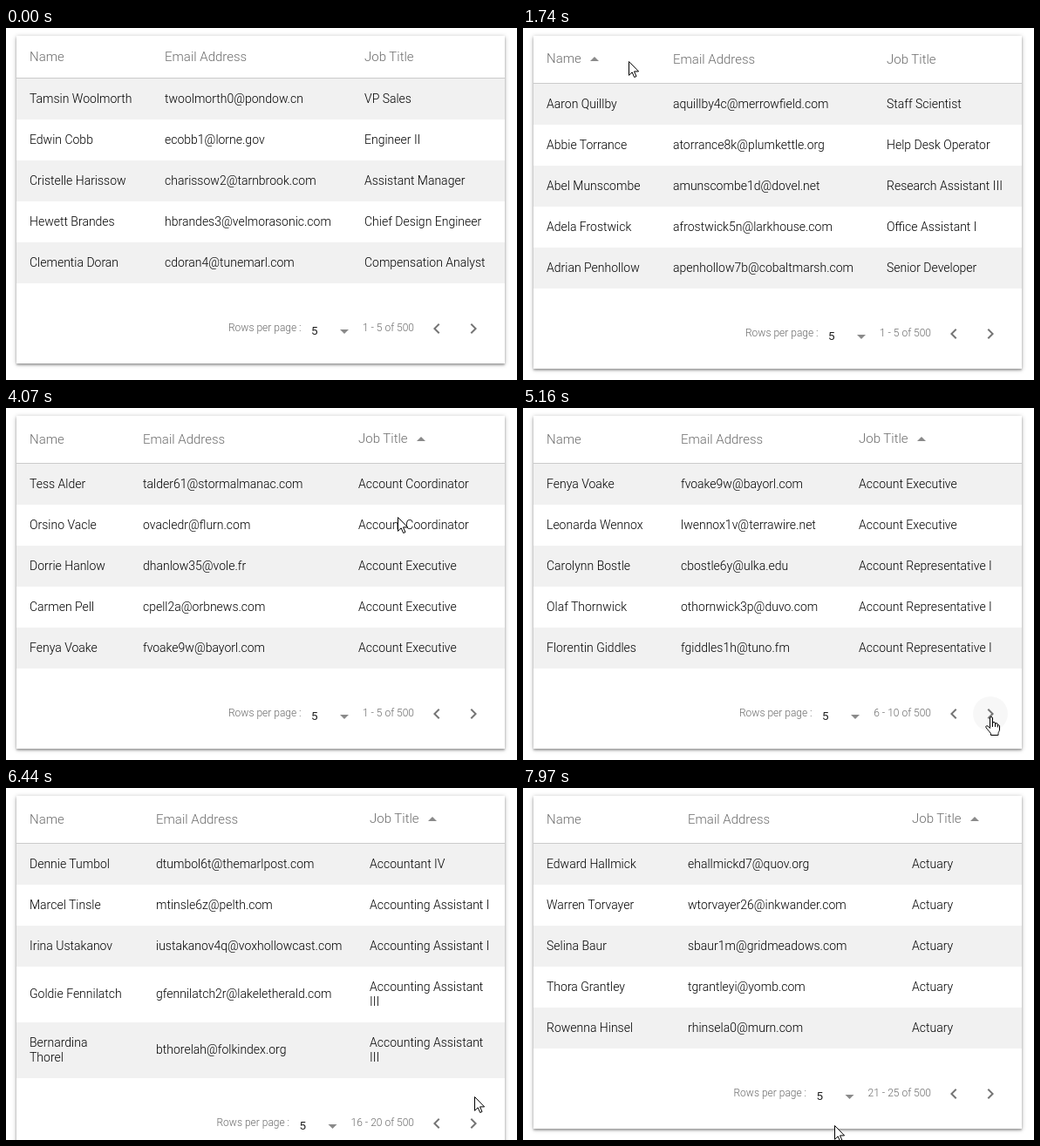
An HTML page that plays this animation: 586 px wide and 404 px high, repeating every 8000 ms.

```html
<!DOCTYPE html>
<html lang="en">
<head>
<meta charset="utf-8">
<title>Sortable table</title>
<style>
html, body { margin: 0; width: 100%; height: 100%; overflow: hidden; background: #fff; }
#stage { position: absolute; left: 0; top: 0; width: 586px; height: 404px; overflow: hidden; }
#card {
  position: absolute; left: 12px; top: 9px; width: 560px; background: #fff;
  box-shadow: 0 2px 2px rgba(0,0,0,.24), 0 1px 5px rgba(0,0,0,.3);
}
svg { position: absolute; left: 0; top: 0; }
text { font-family: Roboto, sans-serif; font-weight: 300; white-space: pre; }
.head { font-size: 15px; fill: #6c6c6c; }
.cell { font-size: 14px; fill: #000; }
.foot { font-size: 12px; fill: #6a6a6a; }
.size { font-size: 13.5px; font-weight: 400; fill: #212121; }
.icon { fill: #757575; }
.tri { fill: #8a8a8a; }
</style>
</head>
<body>
<div id="stage">
  <div id="card"></div>
  <svg width="586" height="404" viewBox="0 0 586 404">
    <g id="table"></g>
    <circle id="ripple" cx="536" r="20" opacity="0"/>
    <g id="foot"></g>
    <g id="cursor" fill="#fff" stroke="#000" stroke-linejoin="round">
      <path id="arrow" d="M.5 .5V16.3L4.2 12.8 6.7 18.5 9 17.5 6.5 11.9H11.6Z"/>
      <g id="hand" transform="translate(-7)">
        <path d="M5.5 13.5V2a1.5 1.5 0 0 1 3 0V8a1.5 1.5 0 0 1 3 0v1a1.4 1.4 0 0 1 2.8 .3v1a1.2 1.2 0 0 1 2.2 .6V15c0 2-1.5 3-1.5 4.5V21.5H6.5V19.5C5 17.5 3 15.5 .9 12.6 .3 11.3 1.8 10.2 3 11Z"/>
        <path fill="none" d="M8.5 8v4M11.5 9v3M14.3 10v2.5"/>
      </g>
    </g>
  </svg>
</div>
<script>
const LOOP = 8000;
const titles = ['Name', 'Email Address', 'Job Title'];
const titleWidth = [40, 94, 57];

// Each view: x of the email and job columns, then rows "name, email, job"; "/" breaks a line.
const view = (email, job, text) => ({
  cols: [27, email, job],
  rows: text.trim().split('\n').map(line => line.split(',').map(s => s.trim()))
});

const start = view(182, 411, `
  Tamsin Woolmorth, twoolmorth0@pondow.cn, VP Sales
  Edwin Cobb, ecobb1@lorne.gov, Engineer II
  Cristelle Harissow, charissow2@tarnbrook.com, Assistant Manager
  Hewett Brandes, hbrandes3@velmorasonic.com, Chief Design Engineer
  Clementia Doran, cdoran4@tunemarl.com, Compensation Analyst`);
const byName = view(172, 417, `
  Aaron Quillby, aquillby4c@merrowfield.com, Staff Scientist
  Abbie Torrance, atorrance8k@plumkettle.org, Help Desk Operator
  Abel Munscombe, amunscombe1d@dovel.net, Research Assistant III
  Adela Frostwick, afrostwick5n@larkhouse.com, Office Assistant I
  Adrian Penhollow, apenhollow7b@cobaltmarsh.com, Senior Developer`);
const byEmail = view(177, 427, `
  Zenobiah Zurelli, zzurelli22@webquill.com, Librarian
  Zacharia Swinmoore, zswinmoorea8@ovlu.com, Safety Technician II
  Zorana Clavenhurst, zclavenhurst3e@sorvane.com, Software Consultant
  Zephyr Barwinde, zbarwinde85@deckhollow.net, Registered Nurse
  Yoren Maddeley, ymaddeley9t@cablewaypartners.com, Director of Sales`);
const jobs = [
  view(157, 404, `
  Tess Alder, talder61@stormalmanac.com, Account Coordinator
  Orsino Vacle, ovacledr@flurn.com, Account Coordinator
  Dorrie Hanlow, dhanlow35@vole.fr, Account Executive
  Carmen Pell, cpell2a@orbnews.com, Account Executive
  Fenya Voake, fvoake9w@bayorl.com, Account Executive`),
  view(181, 385, `
  Fenya Voake, fvoake9w@bayorl.com, Account Executive
  Leonarda Wennox, lwennox1v@terrawire.net, Account Executive
  Carolynn Bostle, cbostle6y@ulka.edu, Account Representative I
  Olaf Thornwick, othornwick3p@duvo.com, Account Representative I
  Florentin Giddles, fgiddles1h@tuno.fm, Account Representative I`),
  view(174, 383, `
  Lorimer Paskett, lpaskett3f@wendlow.com, Account Representative II
  Odelia Crumble, ocrumble8t@nimbor.org, Account Representative III
  Hester Vanlow, hvanlow5a@pondral.com, Account Representative IV
  Garrick Stowe, gstowe2k@fernolt.net, Accountant I
  Minna Tarbold, mtarbold9c@quibe.com, Accountant III`),
  view(172, 417, `
  Dennie Tumbol, dtumbol6t@themarlpost.com, Accountant IV
  Marcel Tinsle, mtinsle6z@pelth.com, Accounting Assistant I
  Irina Ustakanov, iustakanov4q@voxhollowcast.com, Accounting Assistant I
  Goldie Fennilatch, gfennilatch2r@lakeletherald.com, Accounting Assistant/III
  Bernardina/Thorel, bthorelah@folkindex.org, Accounting Assistant/III`),
  view(189, 446, `
  Edward Hallmick, ehallmickd7@quov.org, Actuary
  Warren Torvayer, wtorvayer26@inkwander.com, Actuary
  Selina Baur, sbaur1m@gridmeadows.com, Actuary
  Thora Grantley, tgrantleyi@yomb.com, Actuary
  Rowenna Hinsel, rhinsela0@murn.com, Actuary`)
];

// [time, view, sorted column, direction, page]
const states = [
  [0, start, -1, '', 0],
  [1260, start, 0, 'up', 0],
  [1490, byName, 0, 'up', 0],
  [2480, byName, 1, 'down', 0],
  [2760, byEmail, 1, 'down', 0],
  [3810, byEmail, 2, 'up', 0],
  [3990, jobs[0], 2, 'up', 0],
  [5110, jobs[1], 2, 'up', 1],
  [5850, jobs[2], 2, 'up', 2],
  [6410, jobs[3], 2, 'up', 3],
  [7660, jobs[4], 2, 'up', 4]
];

// [time, opacity] of the button's ripple
const ripples = [
  [0, 0], [4860, .02], [4930, .05], [5110, .04], [5160, .03], [5200, .015], [5240, 0],
  [5550, .025], [5600, .04], [5650, .05], [5850, .03], [5900, 0],
  [6080, .02], [6120, .04], [6160, .05], [6410, 0],
  [7310, .025], [7360, .04], [7410, .05], [7660, 0]
];

const linear = p => p;
const easeOut = p => 1 - (1 - p) * (1 - p);
const easeBoth = p => p * p * (3 - 2 * p);

// [from, to, x0, y0, x1, y1, easing] of the pointer's tip
const moves = [
  [340, 1000, 139, 303, 58, 41, easeBoth],
  [1490, 2130, 58, 41, 243, 32, easeBoth],
  [2990, 3300, 243, 32, 423, 38, easeBoth],
  [3580, 3610, 423, 38, 438, 39, linear],
  [3970, 4070, 438, 39, 449, 124, linear],
  [4070, 4730, 449, 124, 537, 354, easeOut],
  [6930, 7130, 536, 354, 534, 385, easeBoth],
  [7630, 7970, 534, 385, 357, 387, easeBoth]
];

const $ = id => document.getElementById(id);
const last = (list, t) => list.filter(item => item[0] <= t).pop();
const label = (cls, x, y, s, anchor = 'start') =>
  `<text class="${cls}" x="${x}" y="${y}" text-anchor="${anchor}">${s}</text>`;
const triangle = (x, y, dir) =>
  `<path class="tri" d="M${x} ${y}${dir === 'up' ? 'm0 5h10l-5-5z' : 'h10l-5 5z'}"/>`;

let shown = null, buttonY = 345;

function drawTable([, { cols, rows }, sorted, dir, page]) {
  const active = sorted >= 0;
  let y = active ? 64 : 58, out = '';

  cols.forEach((x, i) => {
    const on = i === sorted;
    out += label('head', x, !active ? 38 : on ? 40 : 41, titles[i]);
    if (on) out += triangle(x + titleWidth[i] + 10, dir === 'up' ? 33 : 34, dir);
  });
  out += `<rect x="12" y="${y - 1}" width="560" height="1" fill="#cbcbcb"/>`;

  rows.forEach((row, r) => {
    const cells = row.map(s => s.split('/'));
    const h = 30 + 17 * Math.max(...cells.map(c => c.length));
    if (r % 2 === 0) out += `<rect x="12" y="${y}" width="560" height="${h}" fill="#f1f1f1"/>`;
    cells.forEach((lines, c) => lines.forEach((s, i) => {
      const base = Math.floor(y + h / 2 + 4.5 + (i - (lines.length - 1) / 2) * 17);
      out += label('cell', cols[c], base, s);
    }));
    y += h;
  });
  $('table').innerHTML = out;
  $('card').style.height = y + 92 - 9 + 'px';
  drawFoot(y - 293, page);
}

function drawFoot(dy, page) {
  const dx = [0, -7, -13.5][Math.min(page, 2)];
  buttonY = 345 + dy;
  $('ripple').setAttribute('cy', buttonY);
  $('foot').innerHTML =
    label('foot', 255 + dx, 348 + dy, 'Rows per page :') +
    label('size', 350 + dx, 352 + dy, '5') +
    triangle(383 + dx, 346 + dy, 'down') +
    label('foot', 468, 348 + dy, `${page * 5 + 1} - ${page * 5 + 5} of 500`, 'end') +
    `<path class="icon" transform="translate(482 ${buttonY - 12})" d="M15.41 7.41L14 6l-6 6 6 6 1.41-1.41L10.83 12z"/>` +
    `<path class="icon" transform="translate(524 ${buttonY - 12})" d="M10 6L8.59 7.41 13.17 12l-4.58 4.59L10 18l6-6z"/>`;
}

function drawCursor(t) {
  const move = last(moves, t);
  $('cursor').style.display = move ? '' : 'none';
  if (!move) return;
  const [from, to, x0, y0, x1, y1, ease] = move;
  const p = ease(Math.min(1, (t - from) / (to - from)));
  const x = Math.round(x0 + (x1 - x0) * p), y = Math.round(y0 + (y1 - y0) * p);
  const onTitle = y > 24 && y < 48 &&
    shown[1].cols.some((c, i) => x >= c && x <= c + titleWidth[i] + 22);
  const hand = onTitle || Math.hypot(x - 536, y - buttonY) < 20;
  $('hand').style.display = hand ? '' : 'none';
  $('arrow').style.display = hand ? 'none' : '';
  $('cursor').setAttribute('transform', `translate(${x} ${y})`);
}

function draw(t) {
  const state = last(states, t);
  if (state !== shown) drawTable(shown = state);
  $('ripple').setAttribute('opacity', last(ripples, t)[1]);
  drawCursor(t);
}

const begin = performance.now();
function tick() {
  draw((performance.now() - begin) % LOOP);
  requestAnimationFrame(tick);
}
tick();
</script>
</body>
</html>
```
